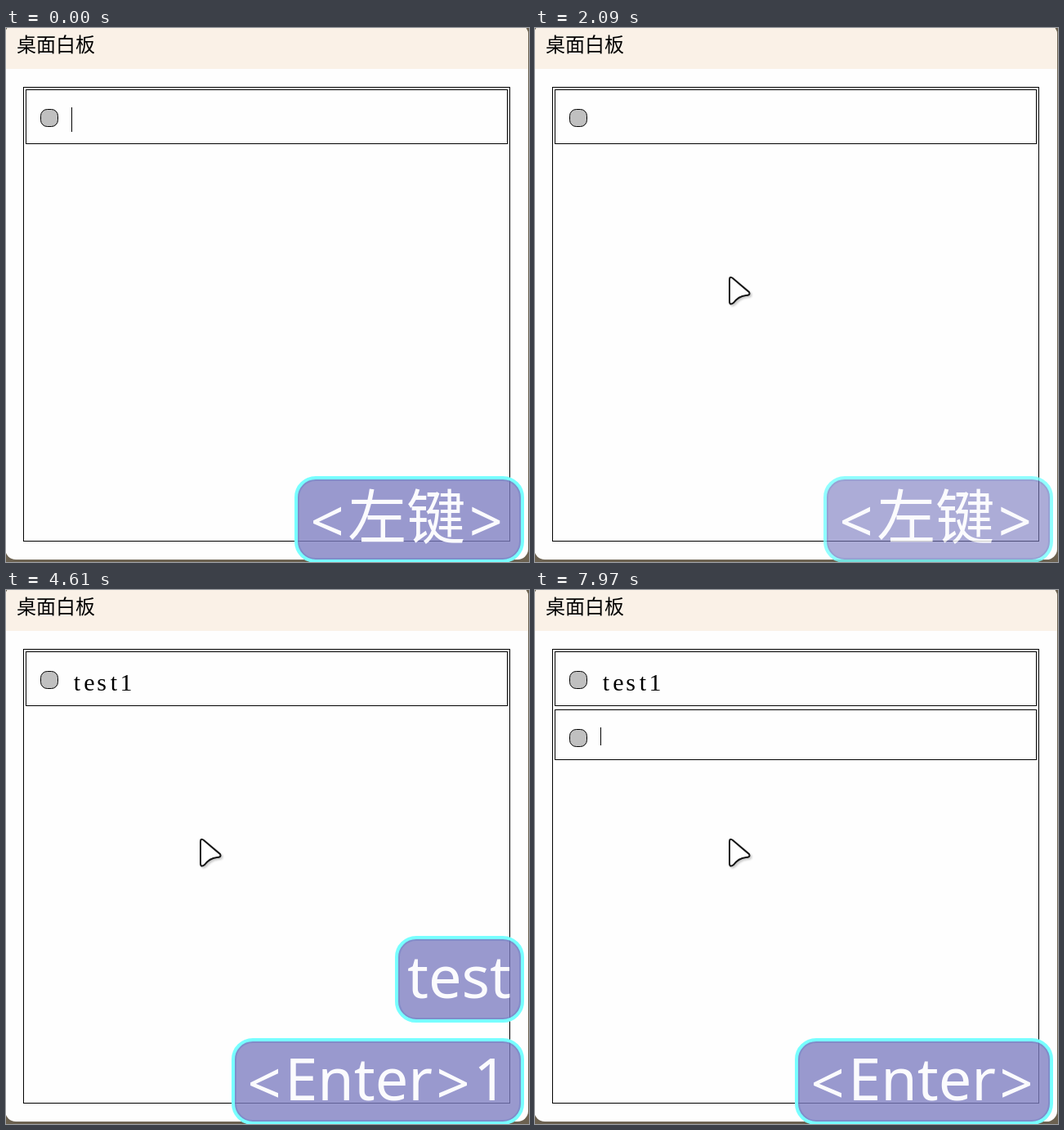
Write an HTML page that moves like this. It is 640 px wide and 653 px high and loops after 8000 ms.

```html
<!DOCTYPE html>
<html lang="zh">
<head>
<meta charset="utf-8">
<style>
html, body { margin: 0; width: 100%; height: 100%; overflow: hidden; background: #6b6150; }
svg { display: block; }
text { font-family: "Noto Sans", "Noto Sans CJK SC", sans-serif; white-space: pre; }
.line { fill: none; stroke: #000; }
.dot { fill: #c0c0c0; stroke: #000; }
#typed { font: 30px "Liberation Serif", serif; text-anchor: middle; }
#bar { filter: drop-shadow(4px 8px 5px #0002); }
#bar text { font-size: 28px; }
#pointer { filter: drop-shadow(2px 2px 1px #0003); }
.badge text { font-size: 72px; font-weight: 500; fill: #fff; fill-opacity: .96; }
</style>
</head>
<body>
<svg id="stage" width="640" height="653" viewBox="0 0 640 653">
  <clipPath id="win"><rect x="-1" y="-5" width="640" height="655" rx="13"/></clipPath>
  <rect width="640" height="653" fill="#6b6150"/>
  <g clip-path="url(#win)">
    <rect width="640" height="653" fill="#fefefe"/>
    <rect width="640" height="50" fill="#faf1e7"/>
  </g>
  <text x="13" y="29" font-size="24">桌面白板</text>
  <rect class="line" x="21.5" y="72.5" width="595" height="555"/>
  <rect class="line" x="24.5" y="75.5" width="589" height="66"/>
  <rect class="dot" x="42.5" y="99.5" width="21" height="21" rx="8"/>
  <g id="row">
    <rect class="line" x="24.5" y="146.5" width="589" height="61"/>
    <rect class="dot" x="42.5" y="170.5" width="21" height="21" rx="8"/>
  </g>
  <text id="typed" y="123"></text>
  <path id="under" stroke="#000" stroke-dasharray="4 2"/>
  <rect id="caret" width="1"/>
  <g id="bar">
    <rect x="-20" y="132.5" width="642" height="69" rx="13" fill="#f9f9f9" stroke="#dedede"/>
    <g id="words"></g>
    <path d="M400.5 139v56M505.5 139v56M563.5 139v56" stroke="#e3e3e3" stroke-width="1.5"/>
    <path d="M434 160v14l-10-7z" fill="#a3a3a3" stroke="#a3a3a3" stroke-width="2" stroke-linejoin="round"/>
    <path d="M472 160v14l10-7z" stroke="#111" stroke-width="2" stroke-linejoin="round"/>
    <path d="M532 153h-4q-6 0-6 6v15q0 6 6 6h15q6 0 6-6v-6" fill="none" stroke="#1a1a1a" stroke-width="2.2"/>
    <path d="M541 169l-8-8c-6-7 4-14 8-7c4-7 14 0 8 7z" fill="#1a1a1a"/>
    <path d="M582 162l11 11l11-11" fill="none" stroke="#1a1a1a" stroke-width="2"/>
  </g>
  <path id="pointer" d="M1 4Q1 -1 5 2L25 19Q27 23 21 23Q12 24 6 32Q1 36 1 30Z" fill="#fff" stroke="#151515" stroke-width="2"/>
</svg>
<script>
const LOOP = 8000, FADE = 420;
const $ = id => document.getElementById(id);
const show = (el, on) => el.style.display = on ? '' : 'none';
const within = (t, a, b) => t >= a && t < b;

function add(parent, tag, attrs, label = '') {
  const el = document.createElementNS('http://www.w3.org/2000/svg', tag);
  for (const k in attrs) el.setAttribute(k, attrs[k]);
  el.textContent = label;
  return parent.appendChild(el);
}

['特首', '特赦', '特设'].forEach((word, i) => {
  const x = 25 + 132 * i;
  add($('words'), 'text', { x, y: 178, fill: '#5c5c5c' }, 5 + i);
  add($('words'), 'text', { x: x + 24, y: 179, fill: '#1a1a1a' }, word);
});

// label, left edge, start, hard end, start of fade, time it moves up
const badges = [
  ['<左键>', 355, 0, LOOP, 1405, 600],
  ['<左键>', 355, 600, LOOP, 2010],
  ['t', 579, 3260, 3340],
  ['te', 538, 3340, 3460],
  ['tes', 504, 3460, 3580],
  ['test', 478, 3580, LOOP, 5150, 4280],
  ['<Enter>', 320, 4280, 4610],
  ['<Enter>1', 278, 4610, LOOP, 5960],
  ['<Enter>', 320, 6890, LOOP]
].map(([label, x, start, end, fade = LOOP, up = LOOP]) => {
  const el = add($('stage'), 'g', { class: 'badge' });
  const frame = (inset, style) => add(el, 'rect', {
    x: x + inset, y: 550 + inset, width: 632 - x - 2 * inset, height: 102 - 2 * inset,
    rx: 24 - inset, fill: 'none', ...style
  });
  frame(0, { fill: 'rgba(125,125,193,.78)' });
  frame(2.5, { stroke: 'rgba(100,125,195,.45)', 'stroke-width': 3 });
  frame(0, { stroke: '#7ff', 'stroke-width': 4 });
  // angle brackets sit lower and get extra room on both sides
  const angle = c => c === '<' || c === '>' ? 1 : 0;
  const shifts = (size, sign) =>
    [...label].map((c, i) => size * (angle(c) + sign * angle(label[i - 1]))).join(' ');
  add(el, 'text', { x: x + 13, y: 624, dx: shifts(4.5, 1), dy: shifts(5, -1) }, label);
  return { el, start, end, fade, up };
});

const typing = [[0, ''], [3260, 't'], [3340, 'te'], [3460, 'te’s'], [3580, 'test'], [4530, 'test1']];
const blinks = [[0, 200], [480, 1020], [1530, 2050], [2530, 3060], [3580, 4120],
  [5190, 5630], [6200, 6730], [6890, 7430], [7970, LOOP]];
const path = [[200, 308, 374], [560, 287, 316], [760, 287, 316], [1040, 237, 304]];

function pointerAt(t) {
  const i = path.findIndex(p => p[0] > t);
  if (i < 0) return path.at(-1).slice(1);
  const [a, b] = [path[Math.max(i - 1, 0)], path[i]];
  const k = Math.max(0, (t - a[0]) / (b[0] - a[0] || 1));
  return [1, 2].map(n => a[n] + (b[n] - a[n]) * k);
}

$('typed').setAttribute('x', [0, 1, 2, 3, 4].map(i => 87 + 15 * i).join(' '));

function draw(t) {
  const text = typing.findLast(s => t >= s[0])[1];
  const edge = 80 + 15 * text.length;
  const second = t >= 6890;
  if ($('typed').textContent !== text) $('typed').textContent = text;
  $('under').setAttribute('d', `M80 124.5H${edge - 2}`);
  const composing = within(t, 3260, 4280);
  show($('under'), composing);
  show($('bar'), composing);
  show($('row'), second);

  $('caret').setAttribute('x', second ? 80 : edge);
  $('caret').setAttribute('y', second ? 168 : 97);
  $('caret').setAttribute('height', second ? 22 : 30);
  show($('caret'), blinks.some(([a, b]) => within(t, a, b)));

  show($('pointer'), t >= 200);
  $('pointer').setAttribute('transform', `translate(${pointerAt(t)})`);

  for (const b of badges) {
    const alpha = Math.min(1, 1 - (t - b.fade) / FADE);
    show(b.el, within(t, b.start, b.end) && alpha > 0);
    b.el.setAttribute('opacity', Math.max(0, alpha));
    b.el.setAttribute('transform', `translate(0 ${t >= b.up ? -125 : 0})`);
  }
}

const begin = performance.now();
function tick() {
  draw((performance.now() - begin) % LOOP);
  requestAnimationFrame(tick);
}
tick();
</script>
</body>
</html>
```
